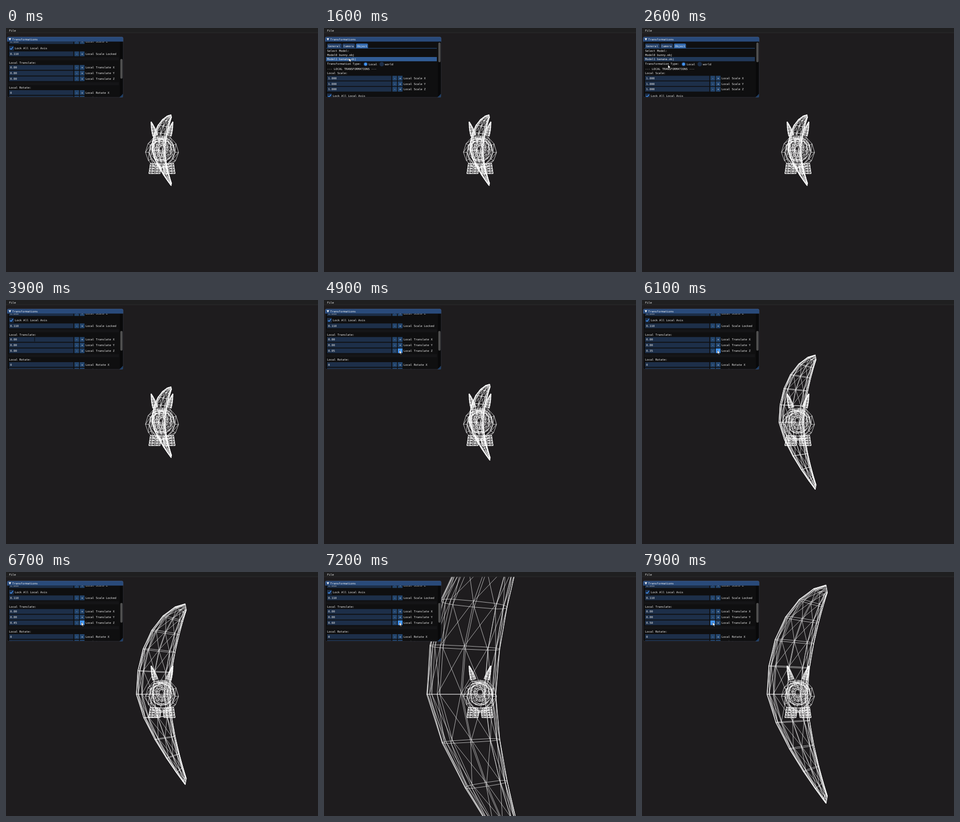
These frames come from a looping animation (600x471 px, 8 s). An HTML page with a canvas:

```html
<!DOCTYPE html>
<html lang="en">
<head>
<meta charset="utf-8">
<title>Transformations</title>
<style>
html, body { margin: 0; width: 100%; height: 100%; overflow: hidden; background: #1e1c1e; }
canvas { display: block; }
</style>
</head>
<body>
<canvas id="stage" width="600" height="471"></canvas>
<script>
const ctx = document.getElementById('stage').getContext('2d');
const LOOP = 8000, CX = 300, CY = 236, DIST = 0.741, UNIT = 767, STEP = 0.05;
const BLUE = '#4296fa', FRAME = '#1d2f49', BUTTON = '#23456d', TEXT = '#f2f2f2';

// time, local translate z
const DEPTH = [[4800, 0], [4900, .05], [5300, .05], [5600, .15], [6100, .35],
  [6700, .45], [7100, .6], [7600, .6], [7900, .5]];
// time, pointer x, pointer y
const PATH = [[1200, 60, 86], [1600, 48, 58], [2200, 48, 58], [2600, 50, 71],
  [3900, 55, 76], [4700, 145, 97], [7200, 145, 97], [7400, 136, 97]];

function sample(keys, t) {
  const next = keys.findIndex(k => k[0] > t);
  if (next === 0) return keys[0].slice(1);
  if (next < 0) return keys[keys.length - 1].slice(1);
  const a = keys[next - 1], b = keys[next], u = (t - a[0]) / (b[0] - a[0]);
  return a.slice(1).map((v, i) => v + (b[i + 1] - v) * u);
}

function noise(seed) {
  const v = Math.sin(seed * 127.1) * 43758.5453;
  return v - Math.floor(v) - 0.5;
}

const repeat = (n, make) => Array.from({ length: n }, (_, i) => make(i));

// Rings of n points, each squeezed towards the two ends of its cross-section.
function tube(rings, n, squeeze) {
  return rings.map(([xl, yl, xr, yr]) => repeat(n, j => {
    const a = (j + 0.5) / n * Math.PI * 2, c = Math.cos(a);
    const k = Math.sign(c) * Math.abs(c) ** squeeze / 2;
    return [(xl + xr) / 2 + (xr - xl) * k, (yl + yr) / 2 + (yr - yl) * k,
      Math.hypot(xr - xl, yr - yl) * 0.15 * Math.sin(a)];
  }));
}

// Concentric, symmetric and slightly irregular rings.
function web(cy, rx, ry, count, n, shrink) {
  return repeat(count, i => repeat(n, j => {
    const a = j / n * Math.PI * 2, side = Math.min(j, n - j);
    const k = (1 - i * shrink) * (1 + 0.16 * noise(i * 31 + side + 1));
    return [Math.sin(a) * rx * k, cy - Math.cos(a) * ry * k, 0];
  }));
}

const bananaRings = repeat(13, i => {
  const y = 68.6 * Math.sin((i - 6) * Math.PI / 12), v = Math.abs(y) / 68.6;
  const rise = y < 0 ? 1 - (1 - v ** 2.2) ** 0.6 : v ** 1.4;
  return [-19.5 + 37 * rise, y, 5.9 + 13.5 * Math.abs(y * 0.93 / 67) ** 1.6, y * 0.93];
});
const earRings = repeat(6, i => {
  const t = i / 5, bulge = Math.sin(t * Math.PI);
  return [-21 + 3 * t - bulge, -55 + 28 * t, -20.5 + 13 * t + bulge, -55 + 25 * t];
});
const footRings = repeat(5, i => {
  const t = i / 4;
  return [-23 - 3 * t, 25 + 20 * t, -3 + Math.sin(t * Math.PI), 27 + 18 * t];
});
const mirror = rings => rings.map(([a, b, c, d]) => [-a, b, -c, d]);
const banana = tube(bananaRings, 14, 0.5);
const bunny = [
  web(4, 30, 32, 3, 12, 0.12),
  web(-1, 22, 24, 3, 16, 0.1),
  web(-3, 16, 18, 4, 14, 0.22),
  ...[earRings, mirror(earRings)].map(r => tube(r, 7, 0.8)),
  ...[footRings, mirror(footRings)].map(r => tube(r, 8, 1))
];

function project([x, y, d], z) {
  const k = DIST / (DIST - z - d / UNIT);
  return [CX + x * k, CY + y * k];
}

function wire(mesh, z, width) {
  const p = mesh.map(ring => ring.map(v => project(v, z)));
  const n = p[0].length;
  const line = (a, b) => { ctx.moveTo(a[0], a[1]); ctx.lineTo(b[0], b[1]); };
  ctx.beginPath();
  p.forEach((ring, i) => ring.forEach((v, j) => {
    const k = (j + 1) % n, next = p[i + 1];
    line(v, ring[k]);
    if (!next) return;
    line(v, next[j]);
    line(v, next[k]);
  }));
  ctx.lineWidth = width;
  ctx.strokeStyle = 'rgba(255,255,255,.85)';
  ctx.stroke();
}

function box(x, y, w, h, color, r = 0) {
  ctx.fillStyle = color;
  ctx.beginPath();
  ctx.roundRect(x, y, w, h, r);
  ctx.fill();
}

function text(s, x, mid) {
  ctx.fillStyle = TEXT;
  ctx.fillText(s, x, mid + 2);
}

function poly(points, color) {
  ctx.beginPath();
  points.forEach(([x, y]) => ctx.lineTo(x, y));
  ctx.closePath();
  ctx.fillStyle = color;
  ctx.fill();
}

function dot(x, y, r, color) {
  ctx.beginPath();
  ctx.arc(x, y, r, 0, 7);
  ctx.fillStyle = color;
  ctx.fill();
}

function field(value, label, y, hot) {
  box(6, y - 4.6, 123.5, 9.2, FRAME);
  text(value, 8, y);
  ['-', '+'].forEach((sign, i) => {
    const x = 131.5 + i * 10.5;
    box(x, y - 4.6, 9, 9.2, hot === sign ? BLUE : BUTTON);
    text(sign, x + 2.9, y);
  });
  text(label, 153, y);
}

function content(s) {
  [['General', 6, 28], ['Camera', 35.5, 24], ['Object', 61.5, 23]].forEach(([name, x, w], i) => {
    box(x, 30, w, 9, i === 2 ? '#3369ad' : '#243f66', [2, 2, 0, 0]);
    text(name, x + 2, 34.8);
  });
  box(4, 38.7, 213, 0.7, '#3369ad');
  text('Select Model:', 6, 44);
  text('Model0 bunny.obj', 6, 52);
  box(4, 56, 213, 8.3, s.rowHover ? '#315c94' : '#213858');
  text('Model1 banana.obj', 6, 60);
  text('Transformation Type:', 6, 68.7);
  dot(80, 69.8, 4.3, FRAME);
  dot(80, 69.8, 2.8, BLUE);
  text('Local', 86, 70);
  dot(111, 69.8, 4.3, FRAME);
  text('world', 117, 70);
  text('--- LOCAL TRANSFORMATIONS ---', 6, 79);
  text('Local Scale:', 6, 87);
  ['X', 'Y', 'Z'].forEach((axis, i) => {
    const last = i === 2;
    field('1.000', 'Local Scale ' + axis, 96.8 + i * 10.7);
    field(last ? s.z.toFixed(2) : '0.00', 'Local Translate ' + axis, 168.2 + i * 10.9, last && s.hot);
    field('0', 'Local Rotate ' + axis, 216.5 + i * 10.8);
  });
  box(6, 126.4, 9, 9, FRAME);
  ctx.beginPath();
  ctx.moveTo(7.8, 131.2);
  ctx.lineTo(9.8, 133.2);
  ctx.lineTo(13.6, 128.7);
  ctx.lineWidth = 1.3;
  ctx.strokeStyle = BLUE;
  ctx.stroke();
  text('Lock All Local Axis', 17, 131);
  field('0.110', 'Local Scale Locked', 141.8);
  box(4, 148.5, 213, 6, '#151517');
  text('Local Translate:', 6, 159);
  box(4, 196.5, 213, 6, '#151517');
  text('Local Rotate:', 6, 207);
}

function panel(s) {
  box(0, 0, 600, 9, '#1f1f20');
  box(0, 8.7, 600, 0.7, '#303033');
  text('File', 6, 4.8);
  box(2, 17, 223.5, 117, '#0f0f10', 3);
  ctx.save();
  ctx.beginPath();
  ctx.rect(3, 26.3, 222, 107);
  ctx.clip();
  box(219, 26.3, 6, 107, '#09090a');
  box(219.8, 28 + s.scroll * 0.345, 4.4, 38, '#4f4f4f', 2);
  ctx.beginPath();
  ctx.rect(3, 26.3, 214.5, 107);
  ctx.clip();
  ctx.translate(0, -s.scroll);
  content(s);
  ctx.restore();
  poly([[225, 127], [225, 133], [224, 134], [218, 134]], '#1d3c63');
  box(2, 17, 223.5, 9.3, '#294a7a', [3, 3, 0, 0]);
  poly([[5, 19.8], [10, 19.8], [7.5, 24.2]], TEXT);
  text('Transformations', 12, 21.8);
  ctx.beginPath();
  ctx.roundRect(2.25, 17.25, 223, 116.5, 3);
  ctx.lineWidth = 0.5;
  ctx.strokeStyle = 'rgba(110,110,128,.5)';
  ctx.stroke();
}

function pointer([x, y], beam) {
  if (beam) {
    box(x - 0.4, y - 4, 0.9, 8, '#08090c');
    return;
  }
  const shape = [[0, 0], [0, 7], [1.6, 5.6], [2.8, 8.2], [3.9, 7.7], [2.8, 5.2], [5, 5]];
  poly(shape.map(([a, b]) => [x + a, y + b]), '#fff');
  ctx.lineWidth = 0.5;
  ctx.strokeStyle = '#000';
  ctx.stroke();
}

function draw(now) {
  const t = Math.floor(now % LOOP / 100) * 100;
  const z = Math.floor(sample(DEPTH, t)[0] / STEP + 1e-6) * STEP;
  const mouse = sample(PATH, t);
  ctx.fillStyle = '#1e1c1e';
  ctx.fillRect(0, 0, 600, 471);
  wire(banana, z, 0.75);
  bunny.forEach(mesh => wire(mesh, 0, 0.85));
  ctx.font = '5.45px "DejaVu Sans Mono", "Liberation Mono", monospace';
  panel({
    z,
    scroll: t >= 1200 && t < 3900 ? 0 : 92,
    rowHover: t >= 1600 && t < 2100,
    hot: t >= 4700 && (mouse[0] < 141 ? '-' : '+')
  });
  if (t >= 1200) pointer(mouse, t >= 3900 && t < 4600);
}

const start = performance.now();
function tick() {
  draw(performance.now() - start);
  requestAnimationFrame(tick);
}
tick();
</script>
</body>
</html>
```
